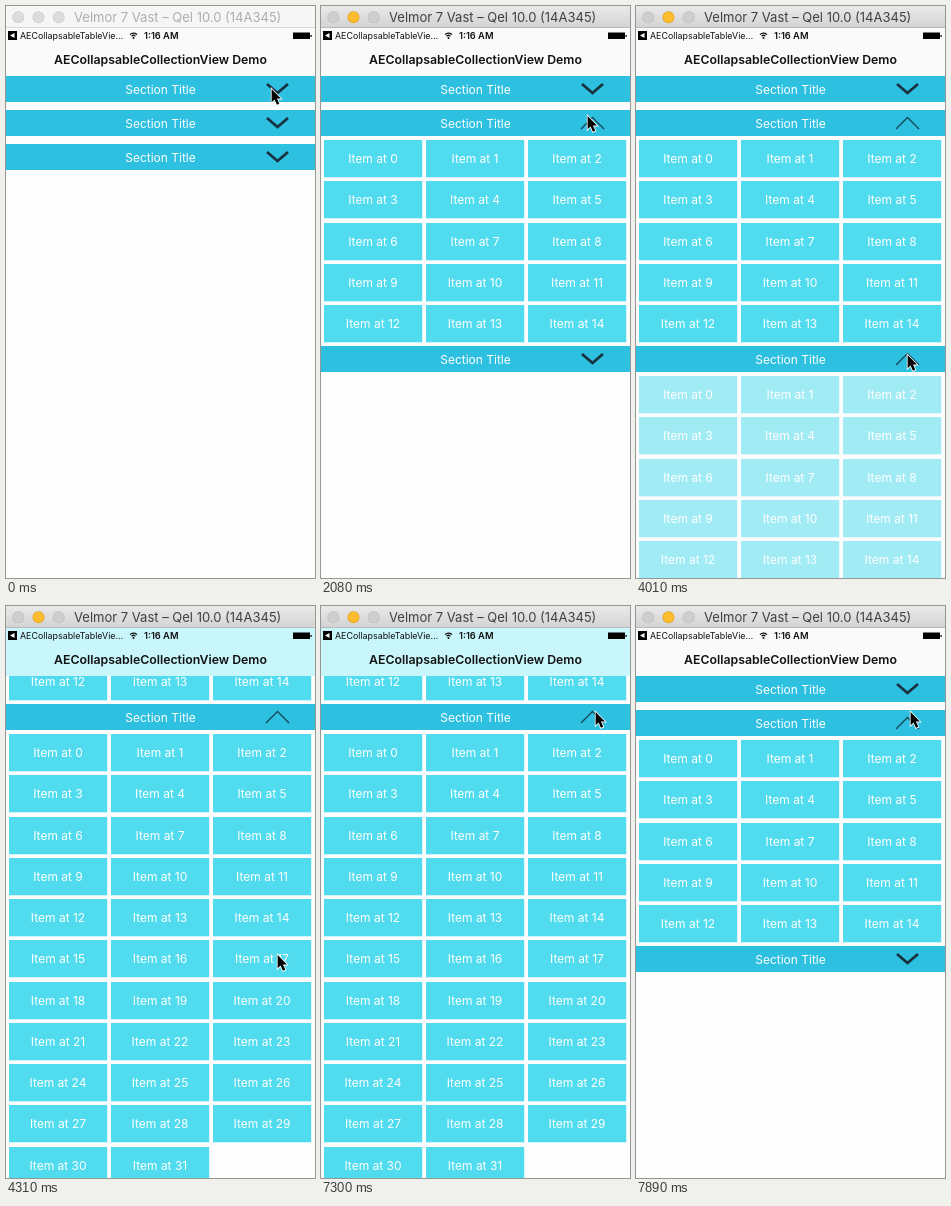
An HTML page with a canvas that plays this animation: 309 px wide and 572 px high, repeating every 8 s.

```html
<!DOCTYPE html>
<html lang="en">
<head>
<meta charset="utf-8">
<title>Collapsable collection view</title>
<style>
  html, body { margin: 0; width: 100%; height: 100%; overflow: hidden; background: #fdfdfd; }
  canvas { display: block; width: 309px; height: 572px; }
</style>
</head>
<body>
<canvas id="stage"></canvas>
<script>
const W = 309, H = 572, LOOP = 8000;
const HEADER_HEIGHT = 26, ROW_PITCH = 41.25, CELL_HEIGHT = 37.3, MAX_SCROLL = 242;
const FONT = 'Inter, Roboto, sans-serif';
const canvas = document.getElementById('stage');
const ctx = canvas.getContext('2d');
const ratio = window.devicePixelRatio || 1;
canvas.width = W * ratio;
canvas.height = H * ratio;

// time, window active, second section open, third section open, scroll fraction
const states = [
  [0, 0, 0, 0, 0],
  [1790, 1, 0.05, 0, 0],
  [1930, 1, 0.55, 0, 0],
  [2080, 1, 1, 0, 0],
  [3870, 1, 1, 0.05, 0],
  [4010, 1, 1, 0.53, 0],
  [4160, 1, 1, 0.95, 0.5],
  [4310, 1, 1, 1, 1],
  [7600, 1, 1, 0.5, 1],
  [7740, 1, 1, 0.05, 0.5],
  [7890, 1, 1, 0, 0],
];

// The pointer swings slightly left on its way down to the third section.
const descent = Array.from({ length: 8 }, (_, i) => {
  const p = (i + 1) / 8;
  const eased = p * p * (3 - 2 * p);
  return [2680 + i * 1040 / 7, 266 + 5 * p - 7.5 * Math.sin(Math.PI * p), 109 + 239 * eased];
});

// time, x, y of the pointer tip
const pointer = [
  [0, 265, 82], [150, 266, 96], [300, 266, 109],
  ...descent,
  [6560, 270, 323], [6700, 259, 148],
  [7000, 264, 135], [7150, 271, 115], [7300, 274, 105],
];

const latest = (steps, time) => steps.findLast(step => step[0] <= time);

function rect(x, y, w, h, color) {
  ctx.fillStyle = color;
  ctx.fillRect(x, y, w, h);
}

function disc(x, y, r, color) {
  ctx.fillStyle = color;
  ctx.beginPath();
  ctx.arc(x, y, r, 0, 2 * Math.PI);
  ctx.fill();
}

function label(text, x, y, size, color, { weight = 400, align = 'left' } = {}) {
  ctx.font = `${weight} ${size}px ${FONT}`;
  ctx.textAlign = align;
  ctx.fillStyle = color;
  ctx.fillText(text, x, y);
}

function line(points, width, color) {
  ctx.beginPath();
  for (const [x, y] of points) ctx.lineTo(x, y);
  ctx.lineWidth = width;
  ctx.strokeStyle = color;
  ctx.stroke();
}

function drawHeader(y, open) {
  rect(0, y, W, HEADER_HEIGHT, '#2dc0e1');
  label('Section Title', 154.5, y + 17.5, 12, '#fff', { align: 'center' });
  if (open) line([[260, y + 19], [271.5, y + 7.5], [283, y + 19]], 1.3, '#174657');
  else line([[261, y + 8], [271.5, y + 17], [282, y + 8]], 2.8, '#18323f');
}

function drawItems(top, count, alpha) {
  if (!alpha) return;
  for (let i = 0; i < count; i++) {
    const x = 3 + (i % 3) * 102;
    const y = Math.round(top + Math.floor(i / 3) * ROW_PITCH);
    ctx.globalAlpha = alpha;
    rect(x, y, 98.2, CELL_HEIGHT, '#50dcee');
    ctx.globalAlpha = 1;
    label(`Item at ${i}`, x + 49, y + 23.2, 12, '#fff', { align: 'center' });
  }
}

function drawStatusBar() {
  rect(2, 25, 9, 9, '#000');
  ctx.fillStyle = '#fff';
  ctx.fill(new Path2D('M4 29.5 L8.5 27 V32 Z'));
  label('AECollapsableTableVie…', 14, 33, 8.9, '#111');
  for (const r of [2.6, 4.8]) {
    ctx.beginPath();
    ctx.arc(127.5, 32, r, -Math.PI * 0.76, -Math.PI * 0.24);
    ctx.lineWidth = 1.2;
    ctx.strokeStyle = '#111';
    ctx.stroke();
  }
  disc(127.5, 32, 1, '#111');
  label('1:16 AM', 138, 33, 9.3, '#111', { weight: 600 });
  rect(287, 26.5, 17, 6.5, '#000');
  rect(304.5, 29, 1.2, 2, '#000');
}

function drawNavigation(scroll) {
  rect(0, 22, W, 48, '#fafafa');
  ctx.globalAlpha = Math.min(1, scroll * 2);
  rect(0, 22, W, 48, '#c8f6fa');
  ctx.globalAlpha = 1;
  drawStatusBar();
  label('AECollapsableCollectionView Demo', 154.5, 58, 12.3, '#111', { weight: 600, align: 'center' });
}

function drawTitleBar(active) {
  const fill = ctx.createLinearGradient(0, 0, 0, 22);
  fill.addColorStop(0, active ? '#e9e9e9' : '#f6f6f6');
  fill.addColorStop(1, active ? '#d3d3d3' : '#f6f6f6');
  rect(0, 0, W, 22, fill);
  rect(0, 21, W, 1, active ? '#b8b8b8' : '#dadada');
  [12.3, 32.5, 52.7].forEach((x, i) => {
    const yellow = active && i === 1;
    disc(x, 11.2, 6, yellow ? '#dfa023' : active ? '#bdbdbd' : '#cecece');
    disc(x, 11.2, 5.4, yellow ? '#fdbd2f' : active ? '#cecece' : '#dcdcdc');
  });
  label('Velmor 7 Vast – Qel 10.0 (14A345)', 68, 16.2, 13, active ? '#404040' : '#adadad');
}

const arrow = new Path2D('M0.7 1 V15.5 L4 12.4 L6.6 18.3 L9.2 17.2 L6.6 11.5 H11 Z');

function drawPointer(x, y) {
  ctx.save();
  ctx.translate(x, y);
  ctx.scale(0.9, 0.92);
  ctx.lineWidth = 1.8;
  ctx.strokeStyle = '#fff';
  ctx.stroke(arrow);
  ctx.fillStyle = '#000';
  ctx.fill(arrow);
  ctx.restore();
}

function draw(time) {
  const [, active, second, third, scroll] = latest(states, time);
  const [, x, y] = latest(pointer, time);
  const offset = scroll * MAX_SCROLL;
  const secondY = 104 - offset;
  const thirdY = 138 + 202 * second - offset;

  ctx.setTransform(ratio, 0, 0, ratio, 0, 0);
  rect(0, 0, W, H, '#fdfdfd');
  drawItems(secondY + 30, 15, second);
  drawItems(thirdY + 30, 32, third);
  drawHeader(70 - offset, false);
  drawHeader(secondY, second > 0.5);
  drawHeader(thirdY, third > 0.5);
  drawNavigation(scroll);
  drawTitleBar(active);
  drawPointer(x, y);
}

const start = performance.now();
function tick() {
  draw((performance.now() - start) % LOOP);
  requestAnimationFrame(tick);
}
tick();
</script>
</body>
</html>
```
